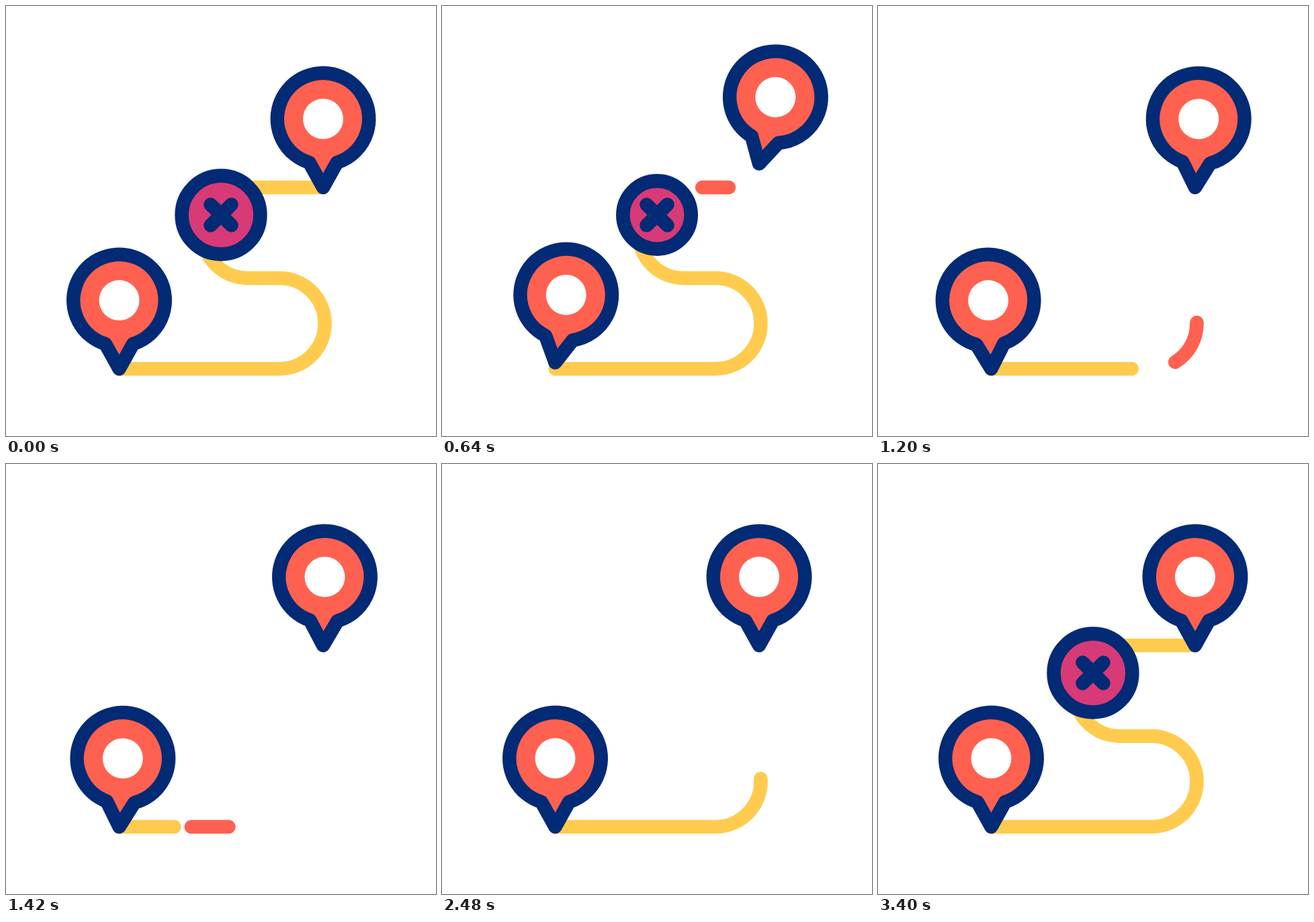
An HTML page with a canvas that plays this animation: 640 px wide and 640 px high, repeating every 3600 ms.

```html
<!DOCTYPE html>
<html lang="en">
<head>
<meta charset="utf-8">
<title>Route</title>
<style>
  html, body { margin: 0; height: 100%; overflow: hidden; background: #fff; }
  canvas { display: block; width: 640px; height: 640px; }
</style>
</head>
<body>
<canvas id="stage" width="640" height="640"></canvas>
<script>
const ctx = document.getElementById('stage').getContext('2d');
const LOOP = 3600, STROKE = 20.6;
const NAVY = '#032a75', RED = '#ff6150', YELLOW = '#ffcb4f', PINK = '#d83a77';

// Route from the upper pin to the lower one
const BEND = 67.5;
const LENGTH = 112 + 47 + 238.5 + 2 * Math.PI * BEND;
const route = new Path2D(`M472 270H360A${BEND} ${BEND} 0 0 0 360 405H407A${BEND} ${BEND} 0 0 1 407 540H168.5`);

// Pin with its tip at the origin
const HEAD_Y = -102, HEAD_R = 68.2, NECK = 1.264;
const pinShape = new Path2D();
pinShape.arc(0, HEAD_Y, HEAD_R, Math.PI - NECK, NECK);
pinShape.lineTo(0, 0);
pinShape.closePath();
const pinHole = new Path2D();
pinHole.arc(0, HEAD_Y, 30, 0, 2 * Math.PI);

const cross = new Path2D('M-15.5 -15.5L15.5 15.5M15.5 -15.5L-15.5 15.5');

// Keyframes are [time, value]; every step eases in and out
const LIFT = [[367, 0], [700, 38.5], [733, 38.5], [1033, 0]];
const TILT = [[67, 0], [800, 15.7], [833, 15.7], [1067, -3.5], [1215, 3.1], [1600, 0]];
const BADGE = [[565, 58.4], [898, 0], [2543, 0], [2876, 58.4]];
const CROSS = [[640, 1], [840, 0], [2640, 0], [2880, 1]];

function ease(t, from, to) {
  const p = Math.min(1, Math.max(0, (t - from) / (to - from)));
  return p * p * (3 - 2 * p);
}

function track(t, keys) {
  let value = keys[0][1];
  for (let i = 1; i < keys.length; i++) {
    const [from, a] = keys[i - 1], [to, b] = keys[i];
    value += (b - a) * ease(t, from, to);
  }
  return value;
}

function drawRoute(color, from, to) {
  const length = (to - from) * LENGTH;
  if (length < 0.05) return;
  ctx.setLineDash([length, 2 * LENGTH]);
  ctx.lineDashOffset = -from * LENGTH;
  ctx.strokeStyle = color;
  ctx.stroke(route);
  ctx.setLineDash([]);
}

function drawBadge(t) {
  const r = track(t, BADGE), size = track(t, CROSS);
  ctx.save();
  ctx.translate(320, 311);
  ctx.strokeStyle = NAVY;
  if (r > 0.1) {
    ctx.beginPath();
    ctx.arc(0, 0, r, 0, 2 * Math.PI);
    ctx.fillStyle = PINK;
    ctx.fill();
    ctx.lineWidth = Math.min(STROKE, 2 * r);
    ctx.stroke();
  }
  if (size > 0.01) {
    ctx.lineWidth = STROKE;
    ctx.scale(size, size);
    ctx.stroke(cross);
  }
  ctx.restore();
}

function drawPin(x, y, t) {
  ctx.save();
  ctx.translate(x, y - track(t, LIFT));
  ctx.rotate(track(t, TILT) * Math.PI / 180);
  ctx.fillStyle = RED;
  ctx.fill(pinShape);
  ctx.strokeStyle = NAVY;
  ctx.stroke(pinShape);
  ctx.fillStyle = '#fff';
  ctx.fill(pinHole);
  ctx.restore();
}

function draw(t) {
  ctx.fillStyle = '#fff';
  ctx.fillRect(0, 0, 640, 640);
  ctx.lineWidth = STROKE;
  ctx.lineCap = ctx.lineJoin = 'round';

  if (t < 1743) drawRoute(YELLOW, ease(t, 103, 1743), 1);
  else drawRoute(YELLOW, 1 - ease(t, 1743, 3383), 1);
  drawRoute(RED, ease(t, 447, 1812), ease(t, 370, 1730));
  drawBadge(t);
  drawPin(472, 270, t);
  drawPin(168.5, 540, t - 167);
}

function frame() {
  draw(performance.now() % LOOP);
  requestAnimationFrame(frame);
}
frame();
</script>
</body>
</html>
```
